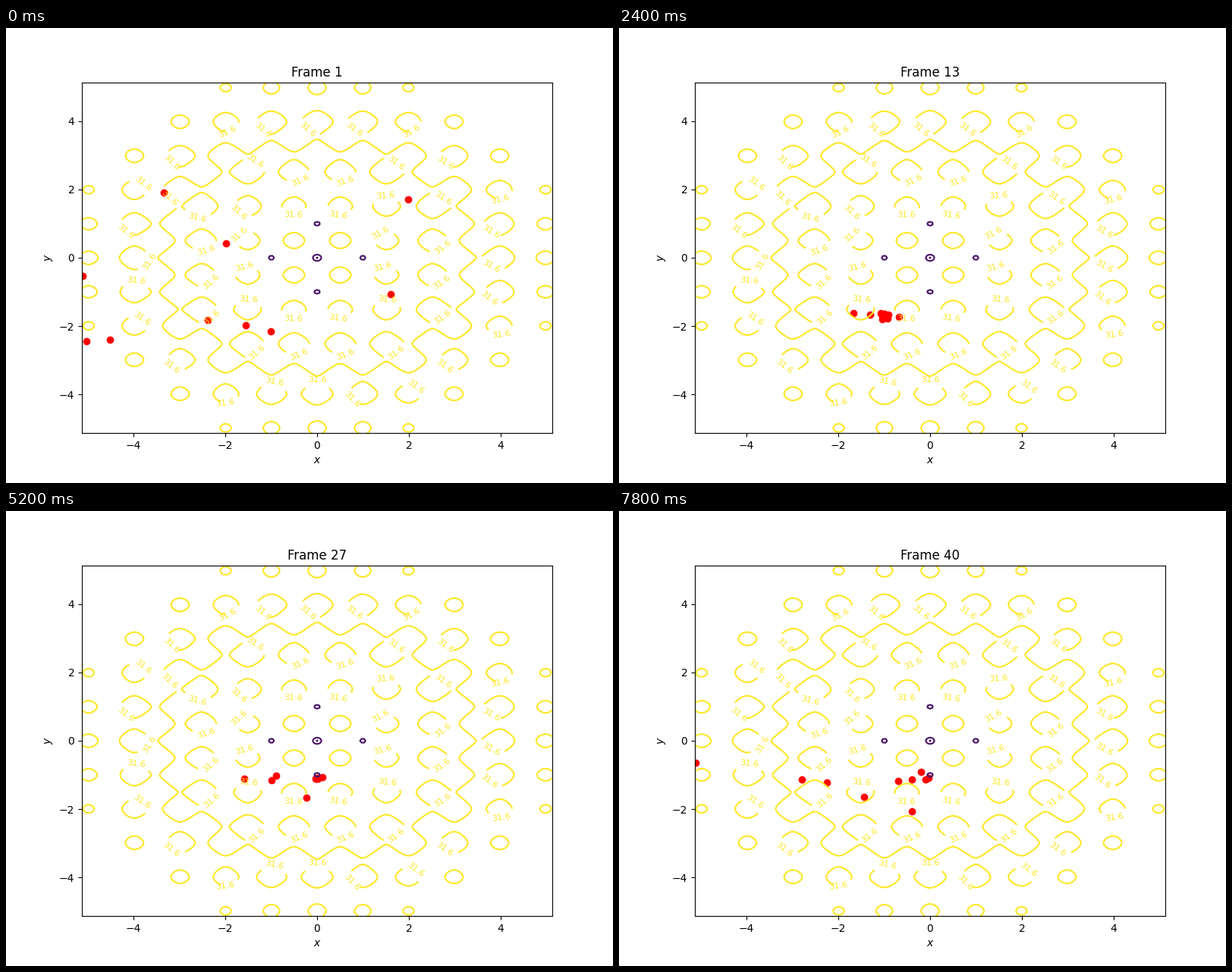
A matplotlib script for the animation above (8000 ms loop, 800 by 600 pixels).

```python
import numpy as np
import matplotlib.pyplot as plt
from matplotlib.animation import FuncAnimation

FRAMES, STEP_MS = 40, 200
LIM, GRID = 5.12, 201

# First and last pose of the ten particles, in data units.
START = np.array([(-3.34, 1.91), (-1.98, 0.42), (1.98, 1.71), (1.60, -1.06),
                  (-5.10, -0.53), (-5.02, -2.44), (-4.51, -2.39),
                  (-2.38, -1.82), (-1.55, -1.97), (-1.00, -2.15)])
END = np.array([(-2.79, -1.13), (-0.69, -1.17), (-0.40, -2.06), (-0.20, -0.91),
                (-5.10, -0.64), (-1.44, -1.64), (-2.25, -1.22),
                (-0.40, -1.13), (-0.03, -1.09), (-0.10, -1.13)])

# The swarm's best point steps through valleys of the function.
BEST_T = (0, 8, 16, 22)
BEST_X = (-1.0, -0.9, -1.1, 0.0)
BEST_Y = (-2.1, -2.3, -1.0, -1.1)

rng = np.random.default_rng(4)
rate = rng.uniform(0.65, 0.95, (len(START), 1))


def rastrigin(x, y):
    return (20 + x**2 - 10 * np.cos(2 * np.pi * x)
            + y**2 - 10 * np.cos(2 * np.pi * y))


def best(t):
    return np.array([np.interp(t, BEST_T, BEST_X), np.interp(t, BEST_T, BEST_Y)])


def swarm(t):
    """Damped swing in from START, then a growing swing out to END."""
    last = FRAMES - 1
    settle = np.exp(-t / 4) * np.cos(rate * t)
    spread = (t / last)**1.25 * (0.4 + 0.6 * np.cos(rate * (last - t)))
    return best(t) + settle * (START - best(0)) + spread * (END - best(last))


fig, ax = plt.subplots(figsize=(8, 6), dpi=100)

axis = np.linspace(-LIM, LIM, GRID)
gx, gy = np.meshgrid(axis, axis)
contours = ax.contour(gx, gy, rastrigin(gx, gy), levels=np.logspace(-1, 1.5, 3))

# Labels are laid out at 72 dpi so that their gaps are measured in points.
fig.set_dpi(72)
ax.clabel(contours, fontsize=8, fmt="%.1f")
fig.set_dpi(100)

ax.set_xlim(-LIM, LIM)
ax.set_ylim(-LIM, LIM)
ax.set_xlabel("$x$")
ax.set_ylabel("$y$")
title = ax.set_title("Frame 1")
dots = ax.scatter(*START.T, c="red")


def update(n):
    dots.set_offsets(swarm(n))
    title.set_text(f"Frame {n + 1}")
    return dots, title


anim = FuncAnimation(fig, update, frames=FRAMES, interval=STEP_MS,
                     repeat=True, repeat_delay=0)
plt.show()
```
